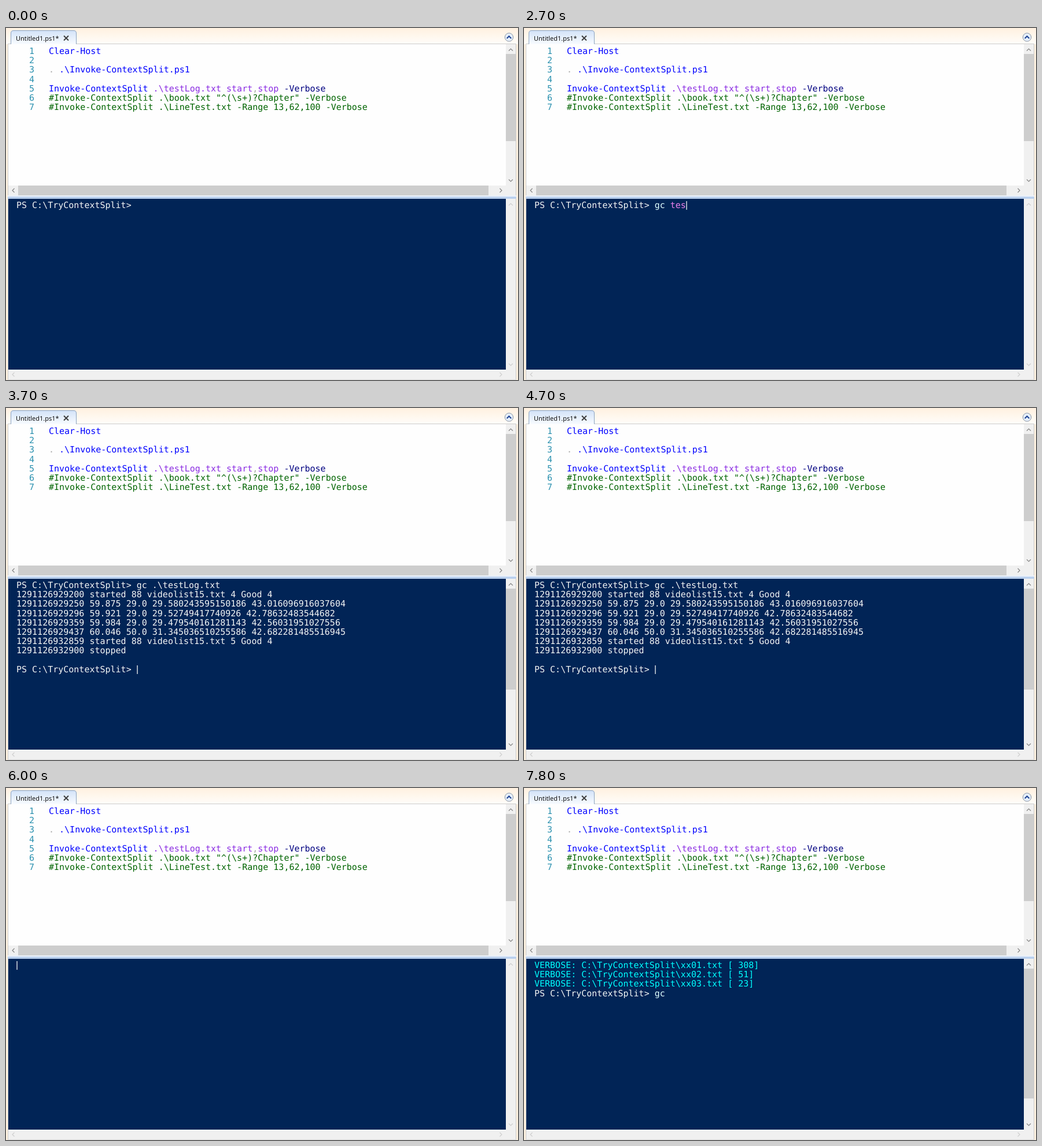
An HTML page for the animation above (8000 ms loop, 885x610 px).

```html
<!DOCTYPE html>
<html lang="en">
<head>
<meta charset="utf-8">
<title>Script editor and console</title>
<style>
  html, body { margin: 0; width: 100%; height: 100%; overflow: hidden; background: #fff1e0; }
  svg { display: block; width: 885px; height: 610px; }
  .code { font: 15px "DejaVu Sans Mono", monospace; white-space: pre; text-rendering: geometricPrecision; }
  .tab { font: 11px "Open Sans", sans-serif; text-rendering: geometricPrecision; }
  .arrow { fill: none; stroke: #868686; stroke-width: 1.2; }
  .arrow.off { stroke: #cfcfcf; }
</style>
</head>
<body>
<svg viewBox="0 0 885 610" xmlns="http://www.w3.org/2000/svg">
  <defs>
    <linearGradient id="strip" x2="0" y2="1">
      <stop offset="0" stop-color="#fff1e0"/><stop offset="1" stop-color="#fffdfa"/>
    </linearGradient>
    <linearGradient id="tabFill" x2="0" y2="1">
      <stop offset="0" stop-color="#d3e3f8"/><stop offset="1" stop-color="#f8fbff"/>
    </linearGradient>
    <linearGradient id="split" x2="0" y2="1">
      <stop offset="0" stop-color="#dce8f8"/><stop offset="1" stop-color="#9dbce6"/>
    </linearGradient>
  </defs>

  <rect width="885" height="610" fill="#fff1e0"/>
  <rect width="885" height="28" fill="url(#strip)"/>
  <path d="M3.5 609V27.5H881.5V609" fill="#f0f0f0" stroke="#cbcbcb"/>
  <path d="M8.5 28V9Q8.5 4.5 13 4.5H117Q121.5 4.5 121.5 9V28" fill="url(#tabFill)" stroke="#8ba3c1"/>
  <text class="tab" x="17" y="22">Untitled1.ps1*</text>
  <path d="M100 13.5L108 21.5M108 13.5L100 21.5" stroke="#3c3c3c" stroke-width="1.9"/>
  <circle cx="869.5" cy="16" r="7.2" fill="#e6effa" stroke="#8a94a3"/>
  <path d="M865.7 18L869.5 14.2L873.3 18" fill="none" stroke="#1e4394" stroke-width="2"/>

  <rect x="4" y="28" width="860" height="245" fill="#fefefe"/>
  <rect x="864" y="45" width="17" height="151" fill="#cdcdcd"/>
  <rect x="21" y="273" width="813" height="17" fill="#cdcdcd"/>
  <rect x="3" y="290" width="879" height="6" fill="#eef3fa"/>
  <rect x="3" y="291.5" width="879" height="4" fill="url(#split)"/>
  <rect x="4" y="296" width="860" height="296" fill="#012456"/>
  <path d="M3 609.5H882" stroke="#dedede"/>

  <rect id="thumb" x="864" y="313" width="17" height="0" fill="#cdcdcd"/>
  <g id="arrows"></g>
  <g id="editor" class="code"></g>
  <g id="console" class="code"></g>
  <rect id="caret" width="1.3" height="15" fill="#f5f5f5"/>
</svg>
<script>
const $ = id => document.getElementById(id);
const raw = String.raw;
const LOOP = 8000, CHAR = 9.03, PITCH = 16.2, LEFT = 18;
const WHITE = '#f5f5f5', CYAN = '#00ffff', BLUE = '#0000ff';
const VIOLET = '#8a2be2', GRAY = '#a9a9a9', GREEN = '#006400';

function add(parent, tag, attrs, text) {
  const el = document.createElementNS('http://www.w3.org/2000/svg', tag);
  for (const key in attrs) el.setAttribute(key, attrs[key]);
  if (text) el.textContent = text;
  parent.append(el);
  return el;
}

// parts: alternating text and colour
function textLine(parent, x, base, row, parts) {
  const el = add(parent, 'text', { x, y: Math.round(base + row * PITCH), 'xml:space': 'preserve' });
  for (let i = 0; i < parts.length; i += 2) add(el, 'tspan', { fill: parts[i + 1] }, parts[i]);
}

function arrow(x, y, angle, off) {
  return add($('arrows'), 'path', {
    class: off ? 'arrow off' : 'arrow',
    d: 'M-3.5 2L0 -1.5L3.5 2',
    transform: `translate(${x} ${y}) rotate(${angle})`
  });
}
arrow(872.5, 37.5, 0);
arrow(872.5, 264.5, 180);
arrow(12.5, 281.5, -90);
arrow(855.5, 281.5, 90);
arrow(12.5, 600.5, -90, true);
arrow(855.5, 600.5, 90, true);
const scrollArrows = [arrow(872.5, 305.5, 0, true), arrow(872.5, 583.5, 180, true)];

[
  ['Clear-Host', BLUE],
  [],
  ['.', GRAY, raw` .\Invoke-ContextSplit.ps1`, BLUE],
  [],
  ['Invoke-ContextSplit', BLUE, raw` .\testLog.txt start`, VIOLET, ',', GRAY, 'stop', VIOLET, ' -Verbose', '#000080'],
  [raw`#Invoke-ContextSplit .\book.txt "^(\s+)?Chapter" -Verbose`, GREEN],
  [raw`#Invoke-ContextSplit .\LineTest.txt -Range 13,62,100 -Verbose`, GREEN]
].forEach((parts, row) => {
  textLine($('editor'), 40, 45, row, [String(row + 1), '#2b91af']);
  textLine($('editor'), 74, 45, row, parts);
});

const prompt = raw`PS C:\TryContextSplit> `;
const command = raw`gc .\testLog.txt`;
const log = `1291126929200 started 88 videolist15.txt 4 Good 4
1291126929250 59.875 29.0 29.580243595150186 43.016096916037604
1291126929296 59.921 29.0 29.52749417740926 42.78632483544682
1291126929359 59.984 29.0 29.479540161281143 42.56031951027556
1291126929437 60.046 50.0 31.345036510255586 42.682281485516945
1291126932859 started 88 videolist15.txt 5 Good 4
1291126932900 stopped
`.split('\n');
const parts = raw`xx01.txt [  308]
xx02.txt [   51]
xx03.txt [   23]`.split('\n').map(s => raw`VERBOSE: C:\TryContextSplit` + '\\' + s);

const blank = { lines: [], thumb: 0 };
const entered = { lines: [prompt + command], thumb: 248 };
const listed = { lines: [prompt + command, ...log], thumb: 175 };
const split = { lines: parts, color: CYAN, thumb: 225 };

// time, screen, typed text (null while no prompt is shown), caret
const steps = [
  [0, blank, '', false],
  [700, blank, '', true],
  [1200, blank, '', false],
  [1600, blank, 'g', true],
  [1800, blank, 'gc', true],
  [2100, blank, 'gc ', true],
  [2500, blank, 'gc te', true],
  [2700, blank, 'gc tes', true],
  [3100, blank, command, true],
  [3600, entered, null, true],
  [3700, listed, '', true],
  [4200, listed, '', false],
  [4700, listed, '', true],
  [5100, listed, '', false],
  [5600, listed, '', true],
  [6000, blank, null, true],
  [6100, split, '', true],
  [6500, split, '', false],
  [6900, split, 'g', true],
  [7100, split, 'gc', true],
  [7300, split, 'gc ', true],
  [7800, split, 'gc ', false]
];

function show([, screen, typed, caretOn]) {
  const out = $('console'), row = screen.lines.length;
  out.replaceChildren();
  screen.lines.forEach((s, i) => textLine(out, LEFT, 312, i, [s, screen.color || WHITE]));
  let col = 0;
  if (typed !== null) {
    textLine(out, LEFT, 312, row, [prompt, WHITE, typed.slice(0, 3), '#e0ffff', typed.slice(3), '#ee82ee']);
    col = prompt.length + typed.length;
  }
  const caret = $('caret');
  caret.setAttribute('x', Math.round(LEFT + col * CHAR) + 0.4);
  caret.setAttribute('y', Math.round(300 + row * PITCH));
  caret.setAttribute('visibility', caretOn ? 'visible' : 'hidden');
  $('thumb').setAttribute('height', screen.thumb);
  scrollArrows.forEach(a => a.classList.toggle('off', !screen.thumb));
}

const start = performance.now();
let current;
function tick() {
  const t = (performance.now() - start) % LOOP;
  const step = steps.findLast(s => s[0] <= t);
  if (step !== current) show(current = step);
  requestAnimationFrame(tick);
}
tick();
</script>
</body>
</html>
```
